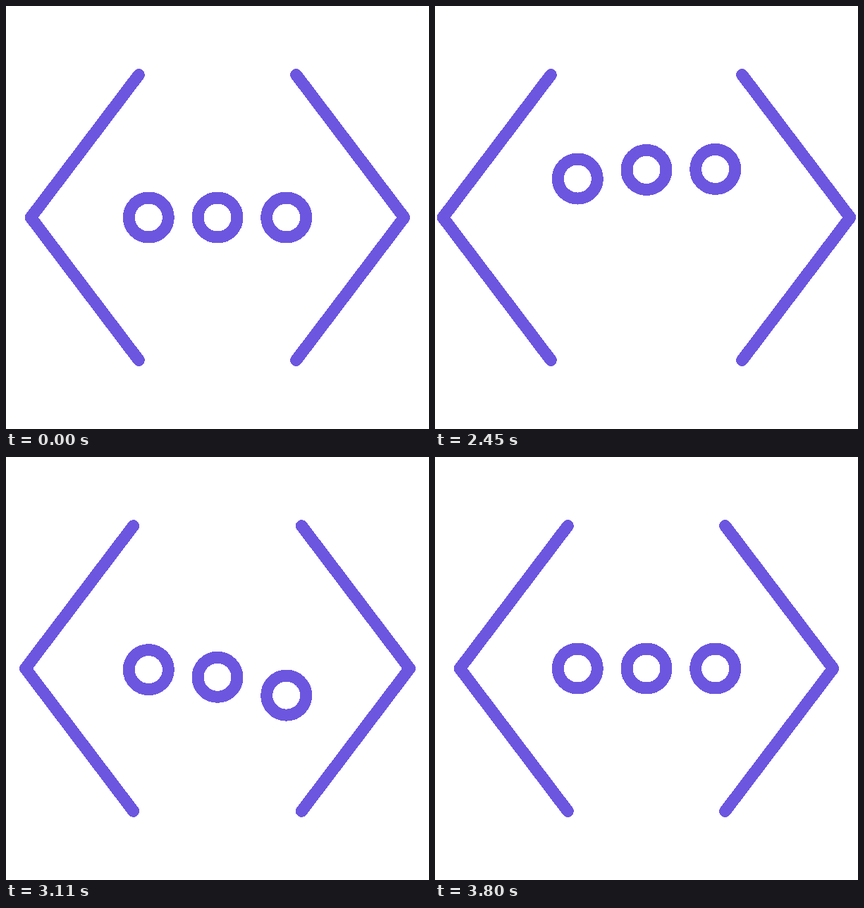
Write an HTML page that moves like this. It is 600x600 px and loops after 3.83 s.

```html
<!DOCTYPE html>
<html lang="en">
<head>
<meta charset="utf-8">
<title>Code brackets</title>
<style>
  html, body { margin: 0; width: 100%; height: 100%; overflow: hidden; background: #fff; }
  svg { display: block; width: 100%; height: 100%; }
  g {
    fill: none;
    stroke: #6c56e0;
    stroke-width: 17;
    stroke-linecap: round;
    stroke-linejoin: round;
    shape-rendering: crispEdges;
  }
</style>
</head>
<body>
<svg viewBox="0 0 600 600">
  <g>
    <path id="left" d="M188.4 97.6 L35.2 300 L188.4 502.4"/>
    <path id="right" d="M411.6 97.6 L564.8 300 L411.6 502.4"/>
    <circle class="dot" cx="202.3" cy="300" r="28"/>
    <circle class="dot" cx="300" cy="300" r="28"/>
    <circle class="dot" cx="397.7" cy="300" r="28"/>
  </g>
</svg>
<script>
  const LOOP = 3830, REST = 2000, STEP = 30;

  // Cubic-bezier easing with handles (x1, 0) and (x2, 1)
  const bezier = (x1, x2) => u => {
    let lo = 0, hi = 1;
    for (let i = 0; i < 30; i++) {
      const s = (lo + hi) / 2, r = 1 - s;
      if (3 * s * r * r * x1 + 3 * s * s * r * x2 + s ** 3 < u) lo = s;
      else hi = s;
    }
    return lo * lo * (3 - 2 * lo);
  };

  const lift = bezier(0.33, 0.6);
  const swing = bezier(0.5, 0.5);
  const spread = bezier(0.33, 0.2);

  // Value at step k on a track of times, values and one easing per segment
  function track(k, times, values, eases) {
    if (k <= times[0]) return values[0];
    const i = times.findIndex(t => t > k);
    if (i < 0) return values[values.length - 1];
    const u = (k - times[i - 1]) / (times[i] - times[i - 1]);
    return values[i - 1] + (values[i] - values[i - 1]) * eases[i - 1](u);
  }

  const heights = [0, -70, 42, -13.6, 0];
  const dotEases = [lift, swing, swing, swing];
  const dotTimes = [
    [0, 10, 28, 42.5, 54],
    [3, 13, 29.5, 44, 57],
    [6, 16, 34, 48.5, 60]
  ];

  const left = document.getElementById("left");
  const right = document.getElementById("right");
  const dots = document.querySelectorAll(".dot");
  const start = performance.now();

  function draw() {
    const t = (performance.now() - start) % LOOP;
    const k = Math.max(0, Math.floor((t - REST) / STEP));
    const gap = track(k, [0, 20, 60], [0, 25, 0], [spread, spread]);
    left.setAttribute("transform", `translate(${-gap} 0)`);
    right.setAttribute("transform", `translate(${gap} 0)`);
    dots.forEach((dot, i) =>
      dot.setAttribute("cy", 300 + track(k, dotTimes[i], heights, dotEases)));
    requestAnimationFrame(draw);
  }
  draw();
</script>
</body>
</html>
```
